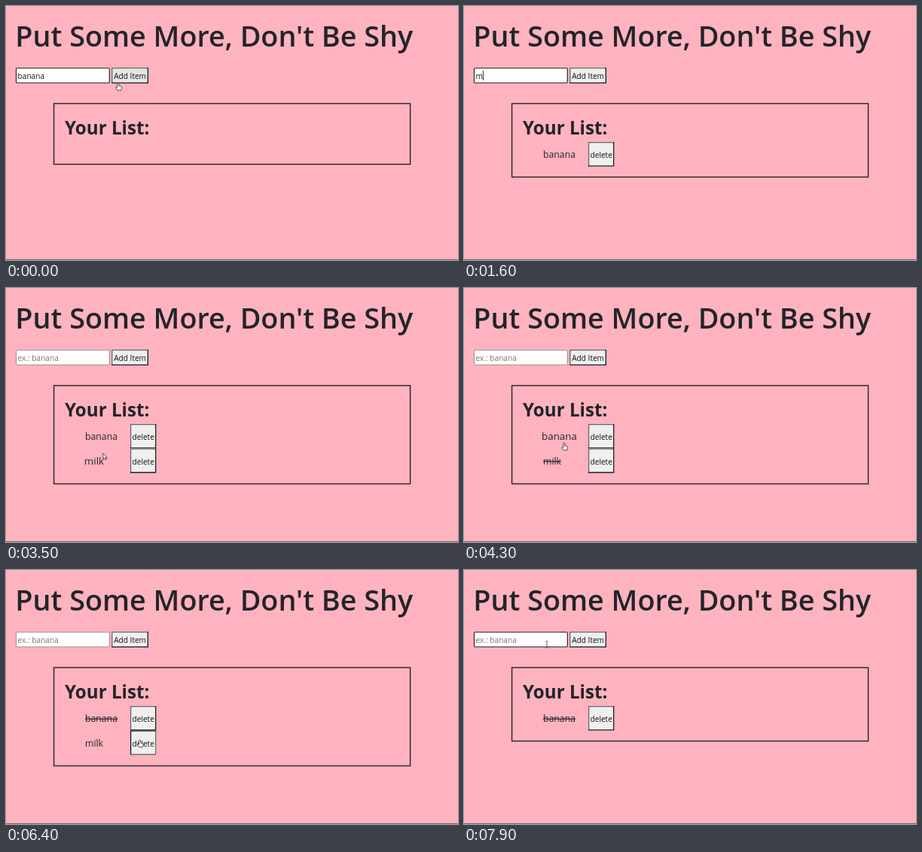
Recreate the animation shown at these times as an HTML page. Size 600x338 px, loop 8000 ms.

```html
<!DOCTYPE html>
<html lang="en">
<head>
<meta charset="utf-8">
<title>Shopping list</title>
<style>
  html, body { margin: 0; width: 100%; height: 100%; overflow: hidden; background: #ffb3be; }
  svg { display: block; width: 100vw; height: 100vh; }
  text { font-family: "Open Sans", "Noto Sans", sans-serif; fill: #212529; }
  .label { font-size: 10.1px; text-anchor: middle; fill: #111; }
  .item { text-anchor: middle; }
  #value { font-size: 10.1px; }
  .edge { fill: none; stroke-width: 1.3; }
  .light, .pressed .dark { stroke: #67676a; }
  .dark, .pressed .light { stroke: #17191c; }
  .cursor { stroke: #222; stroke-width: .8; stroke-linejoin: round; fill: #fff; }
</style>
</head>
<body>
<svg viewBox="0 0 600 338">
  <rect width="600" height="338" fill="#ffb3be"/>
  <rect y="337" width="600" height="1" fill="#76656a"/>
  <text x="12.3" y="54" font-size="37.75" font-weight="600">Put Some More, Don't Be Shy</text>

  <rect id="field" x="13.5" y="82.8" width="123.8" height="19.4" rx="1.3" fill="#fff"/>
  <text id="value" x="15.6" y="97"></text>
  <rect id="caret" y="86" width=".8" height="13"/>
  <g id="add"></g>

  <rect id="frame" x="63.6" y="129.8" width="473" fill="none" stroke="#212529" stroke-width="1.4"/>
  <text x="77.9" y="171" font-size="24.2" font-weight="700">Your List:</text>
  <g id="rows"></g>

  <g id="pointer">
    <path id="arrow" class="cursor" d="M0 0V7.6L1.8 6L3 8.7L4.3 8.1L3.1 5.5H5.4Z"/>
    <path id="hand" class="cursor" d="M-1 .8Q0-.6 1 .8V4L4 4.6Q5 5 4.6 7L3.8 9.8H-1L-3.2 6.6Q-3.4 5.2-1 6.2Z"/>
    <path id="ibeam" d="M-1.6-4H1.6M0-4V4M-1.6 4H1.6" stroke="#444" stroke-width=".8"/>
  </g>
</svg>
<script>
const LOOP = 8000;
const $ = id => document.getElementById(id);
const set = (el, attrs) => { for (const k in attrs) el.setAttribute(k, attrs[k]); };
const show = (el, on) => { el.style.display = on ? '' : 'none'; };
const within = (t, spans) => spans.some(([a, b]) => t >= a && t < b);

// Time, x, y and the pointer shape used until the next stop
const path = [
  [0, 148.8, 102.2, 'hand'], [250, 148.8, 102.2, 'hand'],
  [480, 120, 95, 'ibeam'], [600, 104, 93, 'ibeam'], [1000, 106, 93, 'ibeam'],
  [1500, 128, 96, 'ibeam'], [1600, 128, 96, ''],
  [2700, 129, 100, 'arrow'], [2850, 145, 97, 'hand'], [3100, 150, 96, 'hand'],
  [3200, 146, 118, 'arrow'], [3500, 129, 220, 'arrow'],
  [3600, 124, 230, 'hand'], [3900, 124, 230, 'hand'],
  [4300, 133, 206, 'hand'], [4750, 132, 203, 'hand'],
  [5050, 122, 229, 'hand'], [5500, 122, 229, 'hand'],
  [5800, 158, 228, 'arrow'], [5950, 168, 227, 'hand'],
  [6200, 177.5, 226, 'hand'], [6600, 177.5, 226, 'hand'],
  [6750, 162, 200, 'arrow'], [7050, 118, 108, 'arrow'],
  [7150, 106, 97, 'ibeam'], [7600, 110, 99, 'ibeam'], [LOOP, 110, 99, 'ibeam']
];
const keys = [[1600, 'm'], [1800, 'mi'], [1950, 'mil'], [2100, 'milk']];
const focused = [[0, 200], [900, 3000], [7400, LOOP]];
const blinkStarts = [900, ...keys.map(k => k[0]), 7400];
const addPressed = [[100, 200], [2900, 3000]];
const items = [
  { name: 'banana', y: 181, x: 126.5, half: 21.5, shown: [[200, LOOP]], struck: [[4600, LOOP]], pressed: [] },
  { name: 'milk', y: 213.6, x: 117, half: 12, shown: [[3000, 6500]], struck: [[3800, 5250]], pressed: [[6400, 6500]] }
];

function button(x, y, w, h, label) {
  return `<g class="button"><rect class="face" x="${x}" y="${y}" width="${w}" height="${h}"/>
    <path class="edge light" d="M${x + .6} ${y + h}V${y + .6}H${x + w}"/>
    <path class="edge dark" d="M${x} ${y + h - .7}H${x + w - .7}V${y}"/>
    <text class="label" x="${x + w / 2}" y="${y + h / 2 + 4.6}">${label}</text></g>`;
}

function drawButton(el, hovered, pressed) {
  el.classList.toggle('pressed', pressed);
  set(el.firstChild, { fill: hovered && !pressed ? '#e6e6e6' : '#efefef' });
}

$('add').innerHTML = button(140.2, 82, 48.8, 21, 'Add Item');
$('rows').innerHTML = items.map(({ name, x, y, half }) => `<g>
  <text class="item" x="${x}" y="${y + 21.2}">${name}</text>
  <path class="strike" d="M${x - half} ${y + 17.2}h${2 * half}" stroke="#212529" stroke-width="1.2"/>
  ${button(165, y, 34.4, 32.6, 'delete')}</g>`).join('');
items.forEach((item, i) => {
  const g = $('rows').children[i];
  Object.assign(item, {
    g, text: g.querySelector('.item'), strike: g.querySelector('.strike'), remove: g.querySelector('.button')
  });
});

function pointerAt(t) {
  let i = 0;
  while (i < path.length - 2 && path[i + 1][0] <= t) i++;
  const [t0, x0, y0, kind] = path[i], [t1, x1, y1] = path[i + 1];
  const k = (t - t0) / (t1 - t0);
  return { x: x0 + (x1 - x0) * k, y: y0 + (y1 - y0) * k, kind };
}

function typedAt(t) {
  if (t < 200) return 'banana';
  if (t >= 3000) return '';
  return keys.reduce((text, [at, typed]) => t >= at ? typed : text, '');
}

function drawField(t) {
  const typed = typedAt(t), active = within(t, focused);
  set($('field'), { stroke: active ? '#1c1c1c' : '#948487', 'stroke-width': active ? 1.1 : .9 });
  $('value').textContent = typed || 'ex.: banana';
  $('value').style.fill = typed ? '#111' : '#757575';
  const since = blinkStarts.filter(s => s <= t).pop();
  show($('caret'), active && (t - since) % 1000 < (typed ? 560 : 500));
  set($('caret'), { x: 15.6 + (typed ? $('value').getComputedTextLength() : 0) });
}

function drawList(t, { x, y }) {
  let count = 0;
  for (const item of items) {
    const shown = within(t, item.shown), inRow = y >= item.y && y < item.y + 32.6;
    const hovered = inRow && x > 100 && x < 152;
    count += shown;
    show(item.g, shown);
    show(item.strike, within(t, item.struck));
    set(item.text, { 'font-size': hovered ? 13.4 : 12.25 });
    set(item.strike, { transform: `translate(${item.x}) scale(${hovered ? 1.1 : 1} 1) translate(${-item.x})` });
    drawButton(item.remove, inRow && x > 165 && x < 199, within(t, item.pressed));
  }
  set($('frame'), { height: [80.8, 97.8, 130.8][count] });
}

function draw(t) {
  const pointer = pointerAt(t);
  drawField(t);
  drawList(t, pointer);
  const overAdd = pointer.x > 140 && pointer.x < 189 && pointer.y > 82 && pointer.y < 103;
  drawButton($('add').firstChild, overAdd, within(t, addPressed));
  set($('pointer'), { transform: `translate(${pointer.x} ${pointer.y})` });
  for (const kind of ['arrow', 'hand', 'ibeam']) show($(kind), pointer.kind === kind);
}

const start = performance.now();
function tick() {
  draw((performance.now() - start) % LOOP);
  requestAnimationFrame(tick);
}
tick();
</script>
</body>
</html>
```
